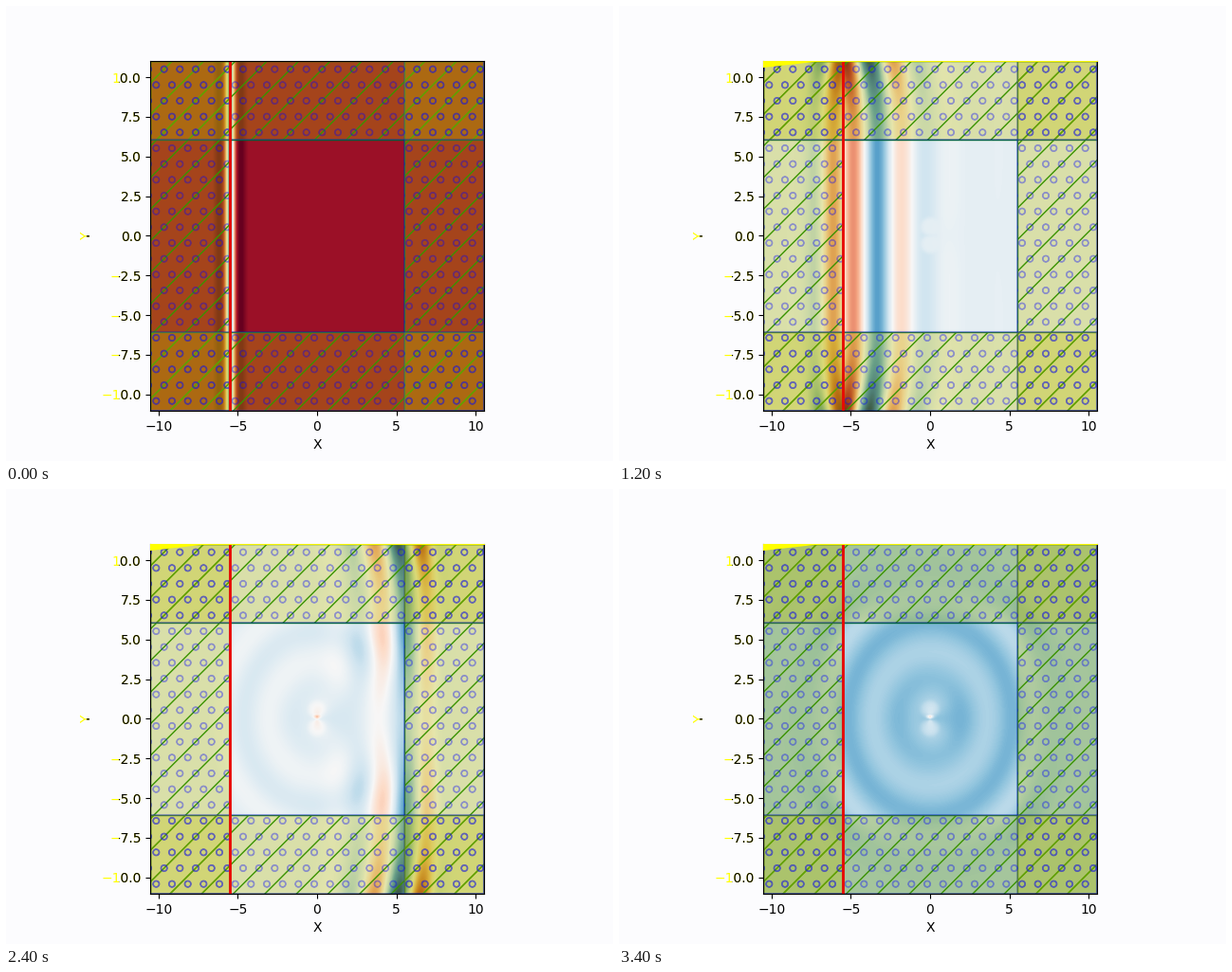
Write a matplotlib script that moves like this. It is 640 px wide and 480 px high and loops after 3500 ms.

```python
import numpy as np
import matplotlib.pyplot as plt
from matplotlib.animation import FuncAnimation
from matplotlib.patches import Polygon, Rectangle
from matplotlib.transforms import Bbox, IdentityTransform

W, H, DPI = 640, 480, 100
FRAMES, STEP = 35, 100
HX, HY = 10.5, 11.05         # half size of the cell
BX, BY = 5.5, 6.05           # half size of the inner, non-absorbing area
SRC = -5.5                   # x of the line source
PERIOD, PEAK, WIDTH = 3.15, 11.5, 2.6
PAPER, YELLOW = "#fcfcfe", "#ffff00"

xs = np.linspace(-HX, HX, 211)
ys = np.linspace(-HY, HY, 222)
X, Y = np.meshgrid(xs, ys)
R = np.hypot(X, Y)
OVAL = np.hypot(X, 0.85 * Y)
AY = np.abs(Y)
DEPTH_X = np.maximum(np.abs(X) - BX, 0)
DEPTH_Y = np.maximum(AY - BY, 0)

FADE = np.exp(-0.13 * DEPTH_X ** 3)
ABSORB = np.exp(-0.8 * (DEPTH_X + DEPTH_Y))
EDGE = (DEPTH_Y / (HY - BY)) ** 2
LOBES = np.exp(-((X ** 2 + (AY - 0.55) ** 2) / 0.36) ** 3)
SHADOW = 1 - 0.55 * np.exp(-(Y / (0.6 + 0.4 * np.maximum(X, 0))) ** 2) * np.clip(X, 0, 1)
FAN = ((X ** 2 - Y ** 2) / (R ** 2 + 0.01) * np.exp(-R / 1.2)
       * (1 + 0.5 * np.clip(X, -1, 1)))
SPOT = np.exp(-(X / 0.2) ** 2 - ((Y - 0.1) / 0.08) ** 2)


def pulse(u):
    """Gaussian wave packet, switched on shortly before u = 0."""
    env = np.exp(-((u - PEAK) / WIDTH) ** 2 / 2) * np.clip(u + 1, 0, 1)
    return -env * np.cos(2 * np.pi * (u - PEAK) / PERIOD)


def ring(u):
    """Slowly dying circular wave from the scatterer."""
    env = np.exp(-np.maximum(u - 13.5, 0) / 4) / (1 + np.exp(-(u - 11.5) * 2))
    return env * np.cos(2 * np.pi * (u - 26.5) / PERIOD)


def field(i):
    """Field at step i, scaled so that its extremes span 0..1."""
    edge = EDGE * min(i / 5, 1)
    wave = pulse(i + 0.15 - np.abs(X - SRC) - 0.5 * edge) * (1 + edge)
    f = wave * FADE * SHADOW * (1 - 0.9 * LOBES)
    core = 0.0
    if i > 12:
        f = f + 0.3 * ring(i - 5.5 - OVAL) / np.sqrt(R + 1) * ABSORB
    if i >= 20:
        core = 2 * np.exp(-max(i - 24, 0) / 4)
        f = f + core * (0.08 * FAN - 0.05 * LOBES - 0.3 * SPOT)
    lo = min(f.min(), -core)
    hi = max(f.max(), 0.45 * core)
    return (f - lo) / (hi - lo)


fig, ax = plt.subplots(figsize=(W / DPI, H / DPI), dpi=DPI, facecolor=PAPER)
image = ax.imshow(field(0), cmap="RdBu", vmin=0, vmax=1, origin="lower",
                  extent=(-HX, HX, -HY, HY), interpolation="spline36", zorder=0)


def absorbers(**style):
    tx, ty = HX - BX, HY - BY
    for x, y, w, h in ((-HX, -HY, tx, 2 * HY), (BX, -HY, tx, 2 * HY),
                       (-HX, BY, 2 * HX, ty), (-HX, -HY, 2 * HX, ty)):
        ax.add_patch(Rectangle((x, y), w, h, **style))


absorbers(facecolor="none", edgecolor="g", hatch="/", zorder=1)
absorbers(facecolor="y", edgecolor="b", hatch="o", linewidth=1.5, alpha=0.3, zorder=1.1)
ax.plot([SRC, SRC], [-HY, HY], color="#ec0800", lw=2, solid_capstyle="butt", zorder=2)

ax.set_xlim(-HX, HX)
ax.set_ylim(-HY, HY)
ax.set_xticks(np.arange(-10, 11, 5))
ax.set_yticks(np.arange(-10, 10.1, 2.5))
ax.set_xlabel("X")
ax.tick_params(axis="y", labelcolor=YELLOW)


def right_of(text, px):
    """Show only the part of a text right of pixel column px."""
    text.set_clip_box(Bbox([[px, 0], [W, H]]))
    text.set_clip_on(True)


# Left-hand labels are yellow on their left side and black on the right.
for v in np.arange(-10, 10.1, 2.5):
    label = f"{v:.1f}".replace("-", "\u2212")
    right_of(ax.annotate(label, (-HX, v), xytext=(-7, 0),
                         textcoords="offset points", ha="right",
                         va="center_baseline", annotation_clip=False), 119)
axis_name = dict(rotation=90, ha="center", va="center")
fig.text(85 / W, 1 - 243 / H, "Y", color=YELLOW, **axis_name)
right_of_name = fig.text(85 / W, 1 - 243 / H, "Y", color="black", **axis_name)
right_of(right_of_name, 85)

wedge = Polygon([(152, 422), (215, 422), (152, 415)], color=YELLOW, lw=0,
                transform=IdentityTransform(), clip_on=False, zorder=3)
ax.add_artist(wedge)


def draw(i):
    image.set_data(field(i))
    wedge.set_visible(i > 0)
    ax.spines["top"].set_color("#f4f400" if i > 0 else "black")
    return [image]


anim = FuncAnimation(fig, draw, frames=FRAMES, interval=STEP,
                     repeat=True, repeat_delay=0, blit=False)
plt.show()
```
